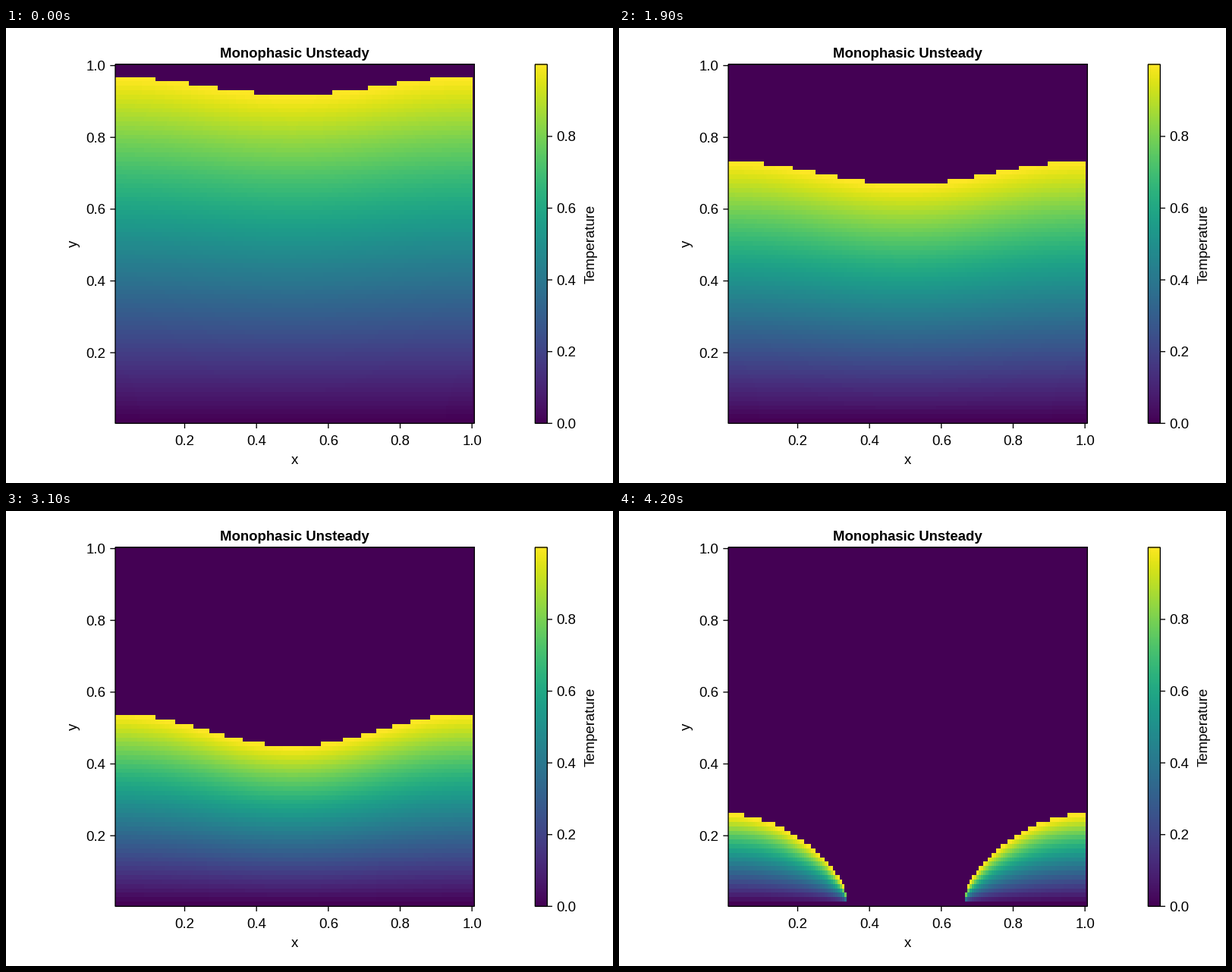
Write a matplotlib script that moves like this. It is 800x600 px and loops after 4300 ms.

```python
import numpy as np
import matplotlib.pyplot as plt
from matplotlib.animation import FuncAnimation
from matplotlib.patches import Rectangle

W, H, DPI = 800, 600, 100
FRAMES, INTERVAL = 43, 100
COLS, ROWS = 161, 81
UNIT = 4 / 3                      # pixels per layout unit
LEFT, TOP, SIDE = 144, 48, 355 * UNIT
RIGHT, BOTTOM = LEFT + SIDE, TOP + SIDE
BAR_LEFT = 523 * UNIT
BAR_RIGHT = BAR_LEFT + 12 * UNIT
TICK = 5 * UNIT

plt.rcParams["font.family"] = "Liberation Sans"
fig = plt.figure(figsize=(W / DPI, H / DPI), dpi=DPI, facecolor="white")
ax = fig.add_axes([0, 0, 1, 1])
ax.axis("off")


def front_height(n):
    """Front height of every column, in rows; its square falls almost linearly."""
    c = np.cos(2 * np.pi * (np.arange(COLS) - 79) / 160)
    start = 75.53 - 1.97 * c
    late = 0.37 * (n / 42) ** 8 * (1 + c)
    rate = 137.75 - 0.116 * n - 0.3 * c - late
    return np.sqrt(np.maximum(start ** 2 - rate * n, 0))


def temperature(n):
    h = front_height(n)
    row = np.arange(ROWS)[:, None]
    eta = np.clip(row / np.maximum(h - 0.5, 0.5), 0, 1)
    field = eta + 0.1 * (eta ** 3 - eta)
    field[row >= np.ceil(h)] = 0
    field[:, -1] = 0              # ghost column
    return field


def picture(data, x0, x1):
    return ax.imshow(data, extent=(x0, x1, BOTTOM, TOP), origin="lower",
                     cmap="viridis", vmin=0, vmax=1, aspect="auto",
                     interpolation="nearest")


def frame_box(x0, x1):
    ax.add_patch(Rectangle((x0, TOP), x1 - x0, SIDE, fill=False, ec="black",
                           lw=UNIT * 72 / DPI, snap=False, zorder=3))


def line(x, y):
    ax.plot(x, y, color="black", lw=UNIT * 72 / DPI, snap=False,
            solid_capstyle="butt", zorder=3)


def label(x, y, s, ha="center", **kw):
    ax.text(x, y, s, ha=ha, va="baseline", fontsize=14 * UNIT * 72 / DPI,
            color="black", rotation_mode="anchor", **kw)


heat = picture(temperature(0), LEFT, RIGHT)
picture(np.linspace(0, 1, 256)[:, None], BAR_LEFT, BAR_RIGHT)
frame_box(LEFT, RIGHT)
frame_box(BAR_LEFT, BAR_RIGHT)

for k in range(1, 6):
    v = k / 5
    x = 235.5 + 473.3 * (v - 0.2)
    y = 428.2 - 473.3 * (v - 0.2)
    line([x, x], [BOTTOM, BOTTOM + TICK])
    label(x, 550, f"{v:.1f}")
    line([LEFT - TICK, LEFT], [y, y])
    label(131.4, y + 6.5, f"{v:.1f}", ha="right")

for k in range(5):
    v = k / 5
    y = BOTTOM - 473 * v
    line([BAR_RIGHT, BAR_RIGHT + TICK], [y, y])
    label(725.4, y + 6.5, f"{v:.1f}", ha="left")

mid_x, mid_y = (LEFT + RIGHT) / 2, (TOP + BOTTOM) / 2
label(mid_x, 39, "Monophasic Unsteady", weight="bold")
label(mid_x, 575, "x")
label(94, mid_y, "y", rotation=90)
label(775.5, mid_y, "Temperature", rotation=90)

ax.set_xlim(0, W)
ax.set_ylim(H, 0)


def update(n):
    heat.set_data(temperature(n))
    return [heat]


anim = FuncAnimation(fig, update, frames=FRAMES, interval=INTERVAL,
                     repeat=True, repeat_delay=0, blit=False)
plt.show()
```
